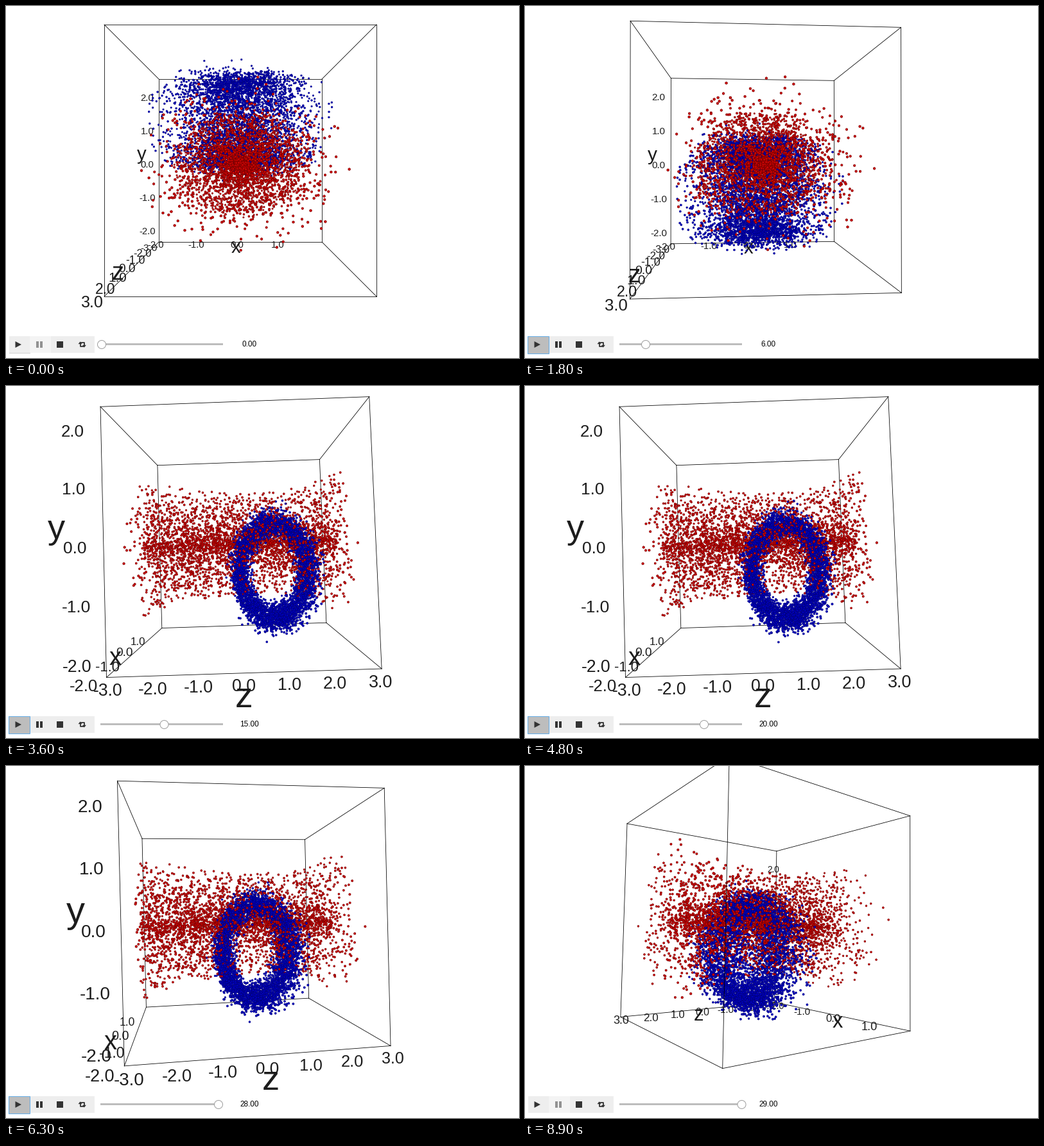
These frames come from a looping animation (799x549 px, 9000 ms). A matplotlib script:

```python
import itertools

import numpy as np
import matplotlib.pyplot as plt
from matplotlib.animation import FuncAnimation
from matplotlib.patches import Circle, Polygon, Rectangle

W, H, STEP, FRAMES = 799, 549, 100, 90
CENTER, FOCAL, DISTANCE = (365, 241), 636, 2
LOW = np.array([-1.99, -2.31, -np.pi])
SPAN = np.array([3.93, 4.78, 2 * np.pi])
FONT, DARK = "Liberation Sans", "#333333"

# Camera poses as yaw, pitch, roll in degrees
FRONT = np.zeros(3)
NUDGED = np.array([4, -.3, 0])
SIDE = np.array([89.5, -2, 1.95])
TILTED = np.array([98.7, 0, 1.4])
CORNER = np.array([-53.7, -2.8, -1])


def ramp(t, start, end):
    return np.clip((t - start) / (end - start), 0, 1)


def smooth(u):
    return u * u * (3 - 2 * u)


def camera(t):
    view = FRONT
    for pose, start, end in ((NUDGED, 1500, 1800), (SIDE, 1800, 2600),
                             (TILTED, 4900, 6200), (CORNER, 7200, 7500)):
        view = view + (pose - view) * ramp(t, start, end)
    swing = 45 * np.sin(np.pi * ramp(t, 4900, 6200))
    return view + (swing, 0, 0)


def beam(rng, n):
    """Tube along z, densest on its axis and widening to both ends."""
    z = rng.uniform(-1, 1, n)
    radius = (1.2 + .45 * z ** 2) * rng.random(n) ** 1.05
    angle = rng.uniform(0, 2 * np.pi, n)
    points = np.c_[radius * np.cos(angle), radius * np.sin(angle), 3 * z]
    return (points - LOW) / SPAN - .5


def ring(rng, n):
    """Fuzzy ring in the y-z plane with unit spread along x."""
    angle = rng.uniform(0, 2 * np.pi, n)
    radius = 1 + rng.normal(0, .14, n)
    spread = np.clip(rng.normal(0, 1, n), -2.4, 2.4)
    return np.c_[spread * (.8 + .35 * abs(np.cos(angle))),
                 .232 * radius * np.sin(angle),
                 .165 * radius * np.cos(angle)]


def ring_at(t):
    """Swing down and forward, settle, then drift slowly back."""
    step = max(0, (t - 900) / 200)
    forward = smooth(ramp(step, 0, 10))
    y = .218 - .37 * smooth(ramp(step, 0, 4.5))
    z = -.27 + .45 * forward - .12 * ramp(step, 10, 29)
    return blue * (.17 - .07 * forward, 1, 1) + (0, y, z)


def project(points, view):
    """Screen x, screen y and pixels per box unit of each point."""
    x, y, z = np.atleast_2d(points).T
    yaw, pitch, roll = np.radians(view)
    x, z = (x * np.cos(yaw) + z * np.sin(yaw),
            z * np.cos(yaw) - x * np.sin(yaw))
    y, z = (y * np.cos(pitch) - z * np.sin(pitch),
            y * np.sin(pitch) + z * np.cos(pitch))
    x, y = (x * np.cos(roll) - y * np.sin(roll),
            x * np.sin(roll) + y * np.cos(roll))
    scale = FOCAL / (DISTANCE - z)
    return CENTER[0] + x * scale, CENTER[1] - y * scale, scale


rng = np.random.default_rng(7)
red, blue = beam(rng, 3800), ring(rng, 4700)
is_red = np.arange(len(red) + len(blue)) < len(red)
face = np.where(is_red[:, None], (.82, .02, .02), (0, 0, .78))
edge = np.where(is_red[:, None], (.45, 0, 0), (0, 0, .48))

fig = plt.figure(figsize=(W / 72 + 1e-9, H / 72 + 1e-9), dpi=72,
                 facecolor="white")
ax = fig.add_axes([0, 0, 1, 1])
ax.set(xlim=(0, W), ylim=(H, 0))
ax.axis("off")

# Box, ticks and axis names
corners = np.array(list(itertools.product((-.5, .5), repeat=3)))
edges = [(i, j) for i, j in itertools.combinations(range(8), 2)
         if abs(corners[i] - corners[j]).sum() == 1]
lines = [ax.plot([], [], color="black", lw=.8)[0] for _ in edges]
labels = []


def add_label(text, axis, along, out, drop, shift, size):
    """Put text beside the lower edge of an axis, moved outward."""
    position = -.5 - np.array([out, drop, out])
    position[axis] = along
    artist = ax.text(0, 0, text, family=FONT, color="#1c1c1c",
                     ha="center", va="center", zorder=2)
    labels.append((artist, position, shift, size))


for k, name in enumerate("xyz"):
    left = 0 if name == "z" else -.028
    for value in range(int(np.ceil(LOW[k])) - (name == "x"),
                       int(LOW[k] + SPAN[k]) + 1):
        along = (value - LOW[k]) / SPAN[k] - .5
        add_label(f"{value:.1f}", k, along, .055, .02, (left, -.012), .06)
    add_label(name, k, 0, .1, .055, (left, .037 * (name == "y")), .12)

cloud = ax.scatter(np.zeros(len(face)), np.zeros(len(face)), s=9,
                   marker="h", linewidths=.6, zorder=3)


# Player controls
def box(x, y, w, h, color, **style):
    return ax.add_patch(Rectangle((x, y), w, h, fc=color, zorder=6,
                                  **{"lw": 0, **style}))


def triangle(points):
    ax.add_patch(Polygon(points, fc=DARK, lw=0, zorder=7))


box(5, 515, 133, 26, "#eeeeee")
pause_back = box(37, 515, 33, 26, "#f4f4f4")
shadow = box(5, 541, 33, 1, "#cfcfcf")
play_back = box(4, 515, 33, 27, "#bdbdbd", ec="#66afe9", lw=1)
triangle([(14.5, 523), (24, 528), (14.5, 533)])
pause_bars = [box(x, 523, 4, 10, DARK) for x in (47, 52.5)]
box(79, 523, 10, 10, DARK)
for sign in (-1, 1):
    def turn(points):
        return np.array(points) * sign + (118.7, 528)
    ax.plot(*turn([(-2.2, -3.4), (3.2, -3.4), (3.2, 1.5)]).T,
            color=DARK, lw=1.8, zorder=7)
    triangle(turn([(.2, .8), (6.2, .8), (3.2, 4.6)]))
box(147, 526, 191, 3, "#bdbdbd")
knob = ax.add_patch(Circle((149, 528), 6.5, fc="white", ec="#9e9e9e",
                           lw=1, zorder=8))
readout = ax.text(379, 528, "", family=FONT, size=11.8, color="black",
                  ha="center", va="center", zorder=8)


def draw_scene(t):
    view = camera(t)
    x, y, scale = project(corners, view)
    for line, (i, j) in zip(lines, edges):
        line.set_data([x[i], x[j]], [y[i], y[j]])
        line.set_zorder(4 if scale[i] + scale[j] > 800 else 1)

    for artist, position, (dx, dy), size in labels:
        (px,), (py,), (s,) = project(position, view)
        artist.set_position((px + dx * s, py - dy * s))
        artist.set_fontsize(size * s)

    x, y, scale = project(np.vstack([red, ring_at(t)]), view)
    order = np.argsort(scale)
    cloud.set_offsets(np.c_[x, y][order])
    cloud.set_sizes((.0098 * scale[order]) ** 2)
    cloud.set_facecolors(face[order])
    cloud.set_edgecolors(edge[order])


def draw_controls(t, clock):
    step = 0 if t < 900 else min(29, (clock - 600) // 200)
    knob.center = (149 + 6.5 * step, 528)
    readout.set_text(f"{step:.2f}")
    playing = 900 <= t < 6700
    play_back.set_visible(700 <= t < 6700)
    shadow.set_visible(t < 700 or 6700 <= t < 8900)
    pause_back.set_visible(not playing)
    for bar in pause_bars:
        bar.set_facecolor(DARK if playing else "#929292")


def draw(frame):
    t = frame * STEP
    # Playback stalls briefly halfway through
    clock = t - 100 if 4500 <= t < 4900 else t
    draw_scene(clock)
    draw_controls(t, clock)
    return []


animation = FuncAnimation(fig, draw, frames=FRAMES, interval=STEP,
                          repeat=True, repeat_delay=0)
plt.show()
```
